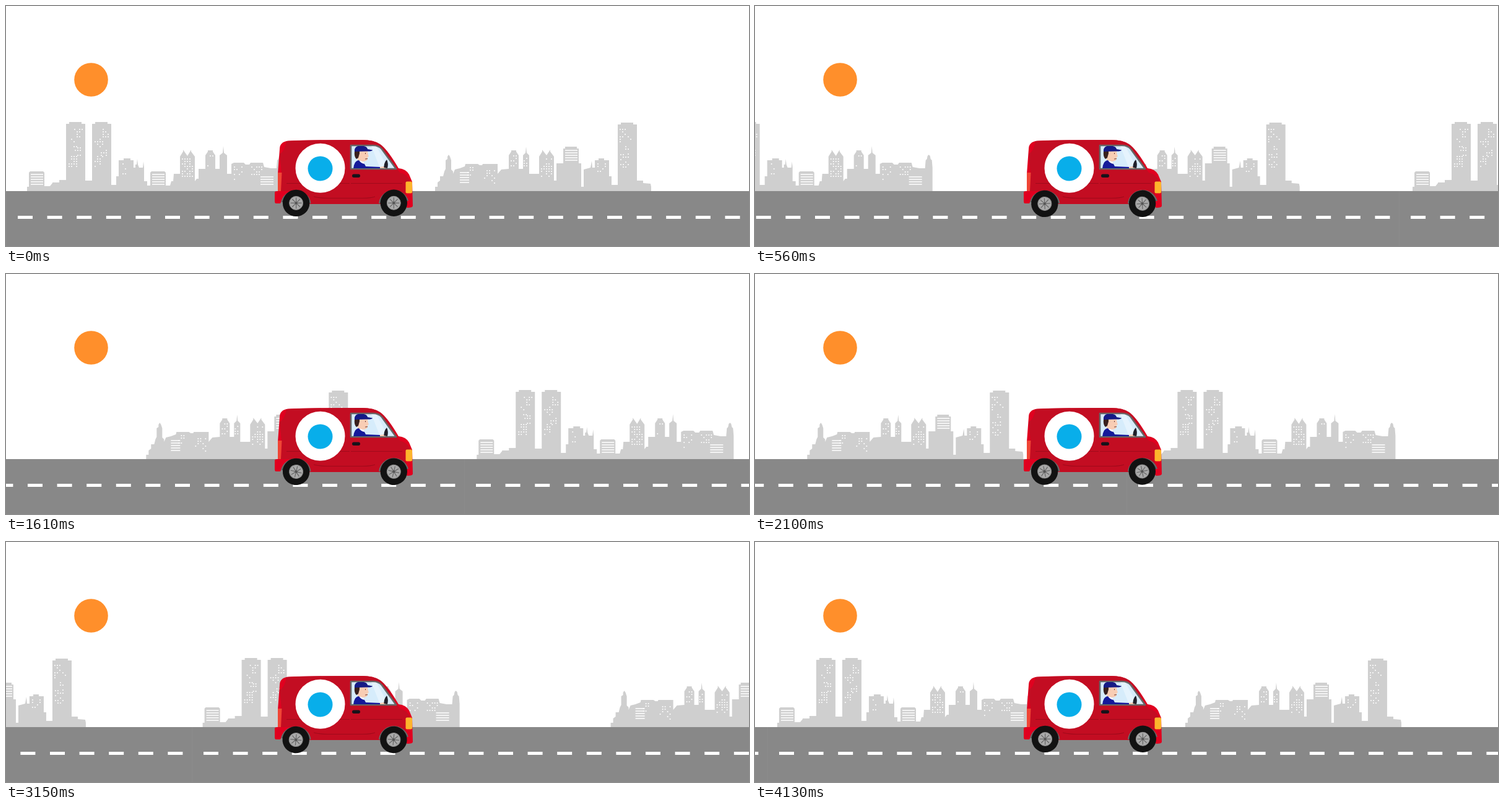
Animation, 1200 px wide and 389 px high, one loop 4.2 s. Source, as an HTML page:

```html
<!DOCTYPE html>
<html lang="en">
<head>
<meta charset="utf-8">
<title>Van on a city road</title>
<style>
  html, body { margin: 0; width: 100%; height: 100%; overflow: hidden; background: #fff; }
  svg { display: block; width: 100%; height: 100%; }
</style>
</head>
<body>
<svg viewBox="0 0 1200 389">
  <defs>
    <g id="skyline">
      <g fill="#cfcfcf">
        <path d="M34 300V293H37V270L39 268H60L62 270V292H71L75 287V286H86V282H97V191H102V188H122V191H128V283H139V191H144V188H164V191H170V290H178V276H182V250H190V247H201V250H206V262H209V257H211L212 248L213 257L215 262H221L222 252L223 262V284H228V291H233V270L235 268H256L258 270V291H265L267 284H270L271 272H281V244L286 236V233L293 243L299 233V236L305 244V284L308 280H311V264H322V242L326 236V234H334V236L338 242V264H345V242L350 238L351 227L352 238L357 242V272H364V256L368 254H384L387 257H393L395 254H415L417 261L428 263H437V262L438 250L440 248L441 243L443 241L445 243L446 248L448 250L449 262V300Z"/>
        <path d="M693 300V293H697V286L701 283V276H706L708 268L710 264V250L713 248V244L715 241L717 244L719 250V265L722 268V272L725 265L733 263L741 260L742 256H762L765 258H769L770 256H794V272L800 265L812 264V242L816 236V234H824V236L828 242V264H835V242L839 238L840 228L841 238L845 242V272H861V244L866 236V233L873 242L879 233V236L885 244V283H889V255H900V231H903V228H922V231H925V255H929V293H933V265L944 262L946 251L947 262H951V250H957V247H966V250H974V276H978V290H988V192H993V189H1013V192H1019V283H1029V287L1041 288L1042 293V300Z"/>
      </g>
      <path id="stripes" stroke="#fff" stroke-width="1.500" fill="none"/>
      <path id="lights" stroke="#fff" stroke-width="2" stroke-linecap="round" fill="none"/>
    </g>
    <g id="road">
      <path d="M.5 300V389" stroke="#8c8c8c"/>
      <path d="M19 342.500H1186" stroke="#fff" stroke-width="5" stroke-dasharray="24 23.600"/>
    </g>
    <g id="wheel">
      <circle r="21.700" fill="#121212"/>
      <circle r="11" fill="#aaa" stroke="#888"/>
      <path id="spokes" stroke="#666" stroke-width="1.200"/>
      <circle r="2" fill="#555"/>
    </g>
    <clipPath id="pane"><path d="M558 227H593Q601 227 606 233L629 263H558Z"/></clipPath>
  </defs>

  <circle cx="137.500" cy="119.500" r="27.300" fill="#ff8f2b"/>
  <use href="#skyline" id="cityA"/>
  <use href="#skyline" id="cityB"/>
  <rect y="300" width="1200" height="89" fill="#888"/>
  <use href="#road" id="roadA"/>
  <use href="#road" id="roadB"/>

  <!-- van body -->
  <path fill="#e0001f" d="M434 302Q434 300 439 300V272L442 232Q442 220 456 218.500Q500 217 575 217Q594 217 604 224Q616 232 634 263Q646 264 651 273L656 285L657 324Q657 327 648 327L640 321H492L445 316L443 320H436Q434 320 434 316Z"/>
  <path fill="#c30d22" d="M444 300L445 270L442 240Q450 236 453 219L464 218.500Q500 217 575 217Q594 217 604 224Q616 232 631 263L636 270Q649 273 653 285L645 287V304L648 312L640 321H492L470 300Z"/>
  <path fill="none" stroke="#a00a1b" stroke-width="1.200" d="M453 287.500H555M557 287.500H640M497 309Q506 311.500 520 311.500H575Q590 311.500 596 309"/>
  <path fill="#f04535" d="M439 270H445.500L444 300H439Z"/>
  <rect x="645.500" y="284.500" width="10.500" height="19" rx="2" fill="#fdb52c"/>
  <rect x="559" y="272.500" width="13" height="5.500" rx="2.700" fill="#17131a"/>
  <circle cx="507.500" cy="262.700" r="40" fill="#fff"/>
  <circle cx="507.500" cy="263.500" r="20" fill="#08aeea"/>

  <!-- window and driver -->
  <path d="M557 226H593Q602 226 607 232L630 264H557Z" fill="#d6ecfb" stroke="#666" stroke-width="2.600" stroke-linejoin="round"/>
  <g clip-path="url(#pane)">
    <path fill="#fff" opacity=".35" d="M590 227H598L617 263H604Z"/>
    <path fill="#f8cdb4" d="M567 235H584L584.500 240L586 244L584 245V248Q583 252 576 252L568 250Z"/>
    <path fill="#38201d" d="M563 235H571V239L569 246L566 248Q562 245 563 235Z"/>
    <path fill="#151a85" d="M563 236Q562 226 574 226.500Q583 227 584 232L592 233.500Q591 236 582 235.500Z"/>
    <path fill="#151a9a" d="M561 264Q562 251 570 250L578 254L581 260L605 261V264Z"/>
    <path fill="#fff" d="M570 250L578 253L579 256Q573 255 570 250Z"/>
    <path fill="#f8cdb4" d="M604 261L610 260L615 262V264H604Z"/>
    <path d="M580.500 238V240M580 248L584 247.500" stroke="#713f35" stroke-width="1"/>
    <path d="M610.500 262Q610 254 615 249Q618 255 616 263Z" fill="#20202a"/>
  </g>

  <!-- wheel arches -->
  <g fill="#444" stroke="#696969" stroke-width="2">
    <path d="M445 318A23.500 22 0 0 1 491.500 320"/>
    <path d="M603 320A23.500 23 0 0 1 649 316"/>
  </g>
  <use href="#wheel" id="rearWheel"/>
  <use href="#wheel" id="frontWheel"/>
</svg>
<script>
const byId = id => document.getElementById(id);

let seed = 7;
const random = () => (seed = seed * 16807 % 2147483647) / 2147483647;

const stripes = (x, y, width, rows, step = 4) =>
  Array.from({ length: rows }, (_, i) => `M${x} ${y + i * step}h${width}`).join('');

function lights(x, y, width, height, density, step = 4) {
  let d = '';
  for (let v = y; v < y + height; v += step)
    for (let u = x; u < x + width; u += step)
      if (random() < density) d += `M${u} ${v}h.01`;
  return d;
}

byId('stripes').setAttribute('d',
  stripes(40, 273, 20, 5) + stripes(236, 273, 20, 5) + stripes(411, 277, 21, 4) +
  stripes(733, 270, 15, 5) + stripes(903, 234, 20, 5));

// Each tower carries a zigzag of lit windows.
const tower = x =>
  lights(x + 14, 200, 13, 16, .55) + lights(x + 5, 216, 13, 14, .45) +
  lights(x + 15, 230, 12, 14, .55) + lights(x + 5, 244, 13, 20, .55);
const blocks = [
  [185, 256, 10, 20, .4], [285, 248, 18, 30, .6], [326, 243, 10, 20, .4],
  [348, 247, 7, 18, .4], [369, 261, 16, 24, .5], [397, 261, 17, 13, .5],
  [746, 262, 15, 14, .5], [773, 263, 18, 26, .5], [816, 243, 10, 20, .4],
  [837, 247, 7, 18, .4], [865, 248, 18, 30, .6], [956, 256, 13, 18, .35]
];
byId('lights').setAttribute('d',
  tower(97) + tower(139) +
  lights(992, 200, 9, 24, .55) + lights(1001, 208, 9, 36, .35) + lights(993, 241, 13, 22, .5) +
  blocks.map(block => lights(...block)).join(''));

byId('spokes').setAttribute('d', Array.from({ length: 8 }, (_, i) => {
  const a = i * Math.PI / 4;
  return `M0 0L${9 * Math.cos(a)} ${9 * Math.sin(a)}`;
}).join(''));

const STEP = 70, STEPS = 60;
const shift = (id, x) => byId(id).setAttribute('transform', `translate(${x} 0)`);

function turnWheel(id, x, y, angle) {
  // The axle sits slightly off centre, so the wheel wobbles.
  byId(id).setAttribute('transform', `translate(${x} ${y}) rotate(${angle}) translate(.4 -.5)`);
}

function draw(now) {
  const step = Math.floor(now / STEP) % STEPS;
  shift('cityA', -20.29 * step);
  shift('cityB', 1189 - 20.12 * step);
  shift('roadA', -20 * step);
  shift('roadB', 1200 - 20 * step);
  const angle = step * 360 * 11 / 59;
  turnWheel('rearWheel', 468.2, 319.9, angle);
  turnWheel('frontWheel', 625.9, 319.8, angle);
}

const start = performance.now();
function tick() {
  draw(performance.now() - start);
  requestAnimationFrame(tick);
}
tick();
</script>
</body>
</html>
```
